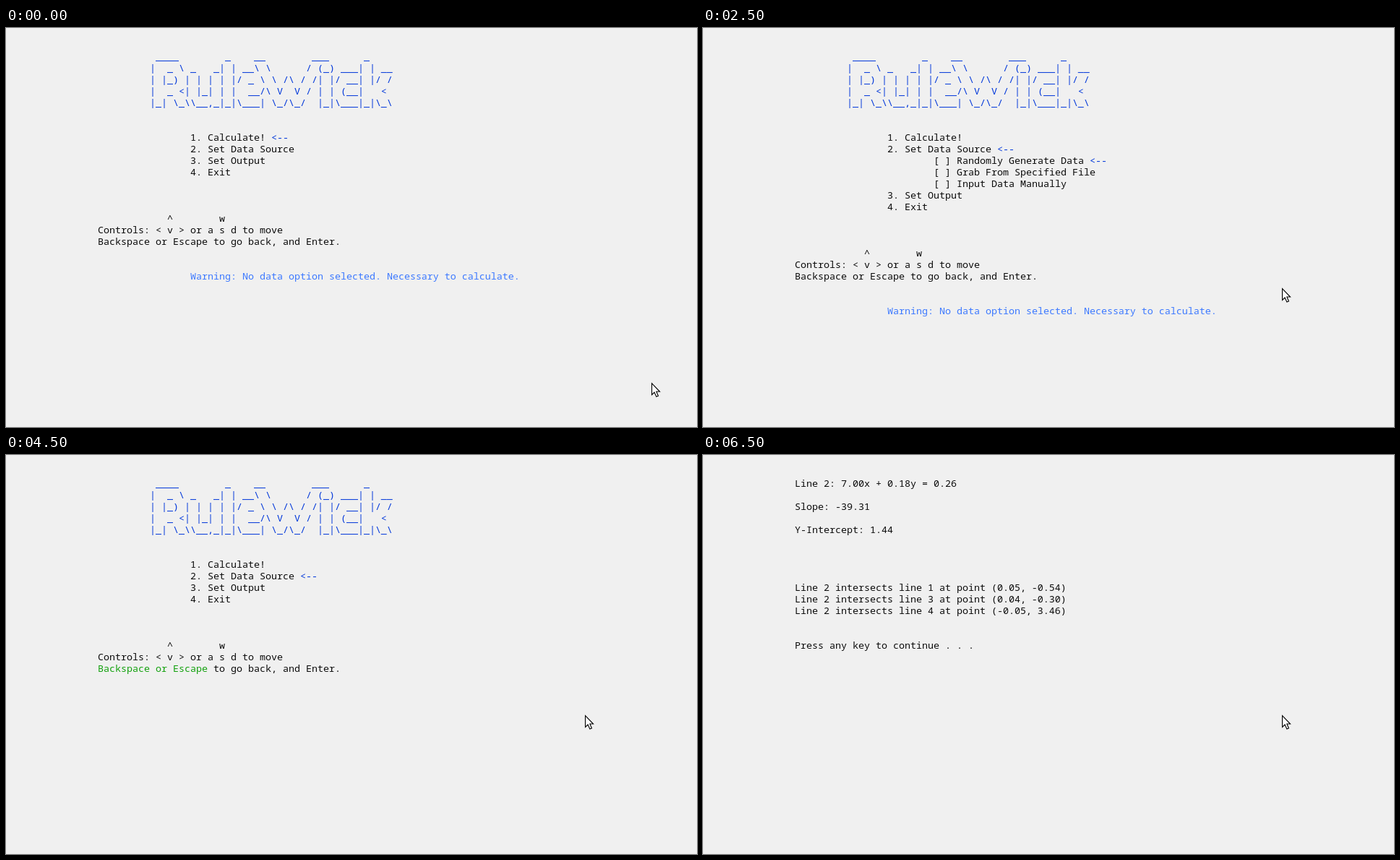
Animation, 956 px wide and 552 px high, one loop 7.2 s. Source, as an HTML page:

```html
<!DOCTYPE html>
<html lang="en">
<head>
<meta charset="utf-8">
<title>Console menu</title>
<style>
  html, body { margin: 0; width: 100%; height: 100%; overflow: hidden; background: #f0f0f0; }
  svg { display: block; width: 956px; height: 552px; }
  text {
    font: 13.3333px "Noto Sans Mono", "DejaVu Sans Mono", monospace;
    font-variant-ligatures: none;
    white-space: pre;
  }
</style>
</head>
<body>
<svg viewBox="0 0 956 552">
  <rect width="956" height="552" fill="#f0f0f0"/>
  <g id="screen"></g>
  <path id="pointer" d="M.5 .5V16.5L4 13L6.8 19L9.4 18L6.8 12H11.5Z" fill="#fff" stroke="#000" stroke-width="1.1"/>
</svg>
<script>
const LOOP = 7200, STEP = 100;
const CELL_W = 8, CELL_H = 16;
const INK = "#0c0c0c", BLUE = "#0037da", BRIGHT = "#3b78ff", GREEN = "#13a10e";
const screen = document.getElementById("screen");
const pointer = document.getElementById("pointer");

const BANNER = [
  String.raw` ____        _    __        ___      _`,
  String.raw`|  _ \ _   _| | __\ \      / (_) ___| | __`,
  String.raw`| |_) | | | | |/ _ \ \ /\ / /| |/ __| |/ /`,
  String.raw`|  _ <| |_| | |  __/\ V  V / | | (__|   <`,
  String.raw`|_| \_\\__,_|_|\___| \_/\_/  |_|\___|_|\_\ `
];
const ITEMS = ["Calculate!", "Set Data Source", "Set Output", "Exit"];
const SOURCES = ["Randomly Generate Data", "Grab From Specified File", "Input Data Manually"];
const PAUSE = "Press any key to continue . . .";

// x coefficient, slope, y-intercept
const LINES = {
  1: [4, 0.8, -0.58],
  2: [7, -39.31, 1.44],
  3: [3.1, -0.62, -0.276],
  4: [6, -1.5, 3.385]
};

// Prints text at a column and row of the console grid.
function print(col, row, str, color = INK) {
  const el = document.createElementNS("http://www.w3.org/2000/svg", "text");
  el.setAttribute("x", col * CELL_W - 1);
  el.setAttribute("y", row * CELL_H + 12);
  el.setAttribute("fill", color);
  el.textContent = str;
  screen.appendChild(el);
}

function printControls(row, key) {
  const tint = name => key === name ? GREEN : INK;
  print(28, row, "^", tint("up"));
  print(37, row, "w", tint("up"));
  print(16, row + 1, "Controls: <");
  print(28, row + 1, "v", tint("down"));
  print(30, row + 1, "> or a");
  print(37, row + 1, "s", tint("down"));
  print(39, row + 1, "d to move");
  print(16, row + 2, "Backspace or Escape", tint("back"));
  print(36, row + 2, "to go back, and");
  print(52, row + 2, "Enter.", tint("enter"));
}

function menu({ pick = 1, open = false, ready = false, key = "" }) {
  BANNER.forEach((line, i) => print(25, 2 + i, line, BLUE));
  let row = 9;
  ITEMS.forEach((item, i) => {
    print(32, row, `${i + 1}. ${item}`);
    if (i === pick) print(36 + item.length, row, "<--", BLUE);
    row++;
    if (!open || i !== 1) return;
    SOURCES.forEach((source, j) => {
      print(40, row, `[${ready && j === 0 ? "x" : " "}] ${source}`);
      if (j === 0) print(45 + source.length, row, "<--", BLUE);
      row++;
    });
  });
  printControls(row + 3, key);
  if (!ready) print(32, row + 8, "Warning: No data option selected. Necessary to calculate.", BRIGHT);
}

function notice() {
  print(32, 3, "Random Values Set!");
  print(32, 4, PAUSE);
}

function report(n) {
  const fix = v => v.toFixed(2);
  const [a, slope, cut] = LINES[n];
  const b = -a / slope;
  print(16, 2, `Line ${n}: ${fix(a)}x + ${fix(b)}y = ${fix(cut * b)}`);
  print(16, 4, `Slope: ${fix(slope)}`);
  print(16, 6, `Y-Intercept: ${fix(cut)}`);
  let row = 11;
  for (const m in LINES) {
    if (+m === n) continue;
    const x = (LINES[m][2] - cut) / (slope - LINES[m][1]);
    print(16, row++, `Line ${n} intersects line ${m} at point (${fix(x)}, ${fix(slope * x + cut)})`);
  }
  print(16, 16, PAUSE);
}

// Start time and screen of each scene.
const SCENES = [
  [0, () => menu({ pick: 0 })],
  [800, () => menu({ key: "down" })],
  [1500, () => menu({})],
  [1800, () => menu({ open: true, key: "enter" })],
  [2400, () => menu({ open: true })],
  [2600, notice],
  [3600, () => menu({ open: true, ready: true, key: "enter" })],
  [4200, () => menu({ open: true, ready: true })],
  [4500, () => menu({ ready: true, key: "back" })],
  [5100, () => menu({ pick: 0, ready: true, key: "up" })],
  [5400, () => report(4)],
  [5900, () => report(3)],
  [6300, () => report(2)]
];

let shown = null;
function draw(time) {
  const t = Math.floor((time % LOOP) / STEP) * STEP;
  const scene = SCENES.filter(s => s[0] <= t).pop();
  if (scene !== shown) {
    screen.textContent = "";
    scene[1]();
    shown = scene;
  }
  const p = Math.min(t / 700, 1), ease = p * p * (3 - 2 * p);
  pointer.setAttribute("transform", `translate(${Math.round(893 - 92 * ease)} ${Math.round(491 - 131 * ease)})`);
}

const start = performance.now();
function tick() {
  draw(performance.now() - start);
  requestAnimationFrame(tick);
}
tick();
</script>
</body>
</html>
```
